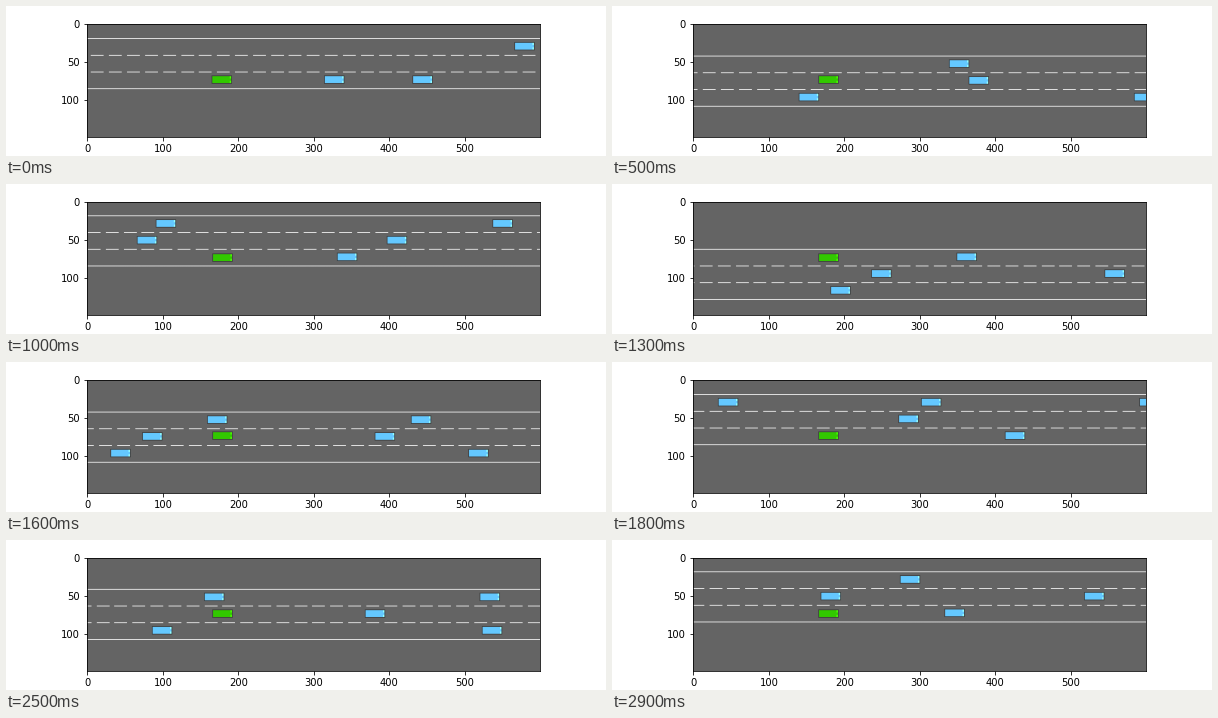
Animation, 600 px wide and 150 px high, one loop 3000 ms. Source, as a matplotlib script:

```python
import numpy as np
import matplotlib.pyplot as plt
from matplotlib.animation import FuncAnimation

W, H, DPI = 600, 150, 72
STEPS, INTERVAL = 30, 100
LANE = 22                      # lane width in pixels
TRAVEL = 30 * 5.5              # pixels the green car covers per step
DASH, SPACING = 17, 4.33 * 5.5
CAR_W, CAR_H = 27, 11

ROAD, LINE, EDGE = (100, 100, 100), (255, 255, 255), (60, 60, 60)
GREEN, BLUE = (50, 200, 0), (100, 200, 255)

# Steps at which the green car starts a lane change
GO_LEFT = (1, 2, 10, 11, 21)
GO_RIGHT = (4, 6, 15, 16, 26)

# Traffic per lane, from the left: (start x, speed) relative to the green car
TRAFFIC = [
    [(579.8, -50), (1166.4, -64), (1450.8, -64.9), (1696.7, -62.5), (2049, -62)],
    [(658, -60.3), (934.8, -54.9), (1248.5, -55.3), (1601.7, -50.2), (1945, -50)],
    [(327.5, -73), (444.5, -62.6), (830.3, -51), (1240, -47), (1701.5, -48)],
]


def progress(k, starts):
    """Lane changes done by step k, each a quick, slightly overshooting ease."""
    t = np.maximum(k - np.array(starts), 0)
    return np.sum(1 - np.exp(-2.3 * t) * np.cos(0.7 * t))


def fill(img, x, y, w, h, color):
    img[max(y, 0):max(y + h, 0), max(x, 0):max(x + w, 0)] = color


def draw_car(img, x, y, color):
    light = [min(int(c / 0.68), 255) for c in color]
    fill(img, x, y, CAR_W, CAR_H, EDGE)
    fill(img, x + 1, y + 1, CAR_W - 2, CAR_H - 2, color)
    for dy in (1, 7):
        fill(img, x + 24, y + dy, 2, 3, light)


def scene(k):
    img = np.full((H, W, 3), ROAD, np.uint8)
    left, right = progress(k, GO_LEFT), progress(k, GO_RIGHT)
    top = int(20 + LANE * (left - right))
    # distance lost while speeding up and while changing lanes
    slip = 16.5 * (1 - np.exp(-k / 0.6)) + 2 * (left + right)

    img[[top, top + 3 * LANE]] = LINE
    start = int(5.5 - TRAVEL * k + slip)
    dashes = (np.arange(W) - start) % SPACING < DASH
    for row in (top + LANE, top + 2 * LANE):
        img[row, dashes] = LINE

    for lane, cars in enumerate(TRAFFIC):
        for x, speed in cars:
            nose = int(np.floor(x + speed * k + slip - 13))
            draw_car(img, nose, top + 5 + LANE * lane, BLUE)
    draw_car(img, 165 + min(k, 1), 69, GREEN)
    return img


fig, ax = plt.subplots(figsize=(W / DPI, H / DPI), dpi=DPI)
fig.subplots_adjust(left=0.125, right=0.9, bottom=0.125, top=0.88)
view = ax.imshow(scene(0))


def update(k):
    view.set_data(scene(k))
    return [view]


anim = FuncAnimation(fig, update, frames=STEPS, interval=INTERVAL,
                     repeat=True, repeat_delay=0)
plt.show()
```
